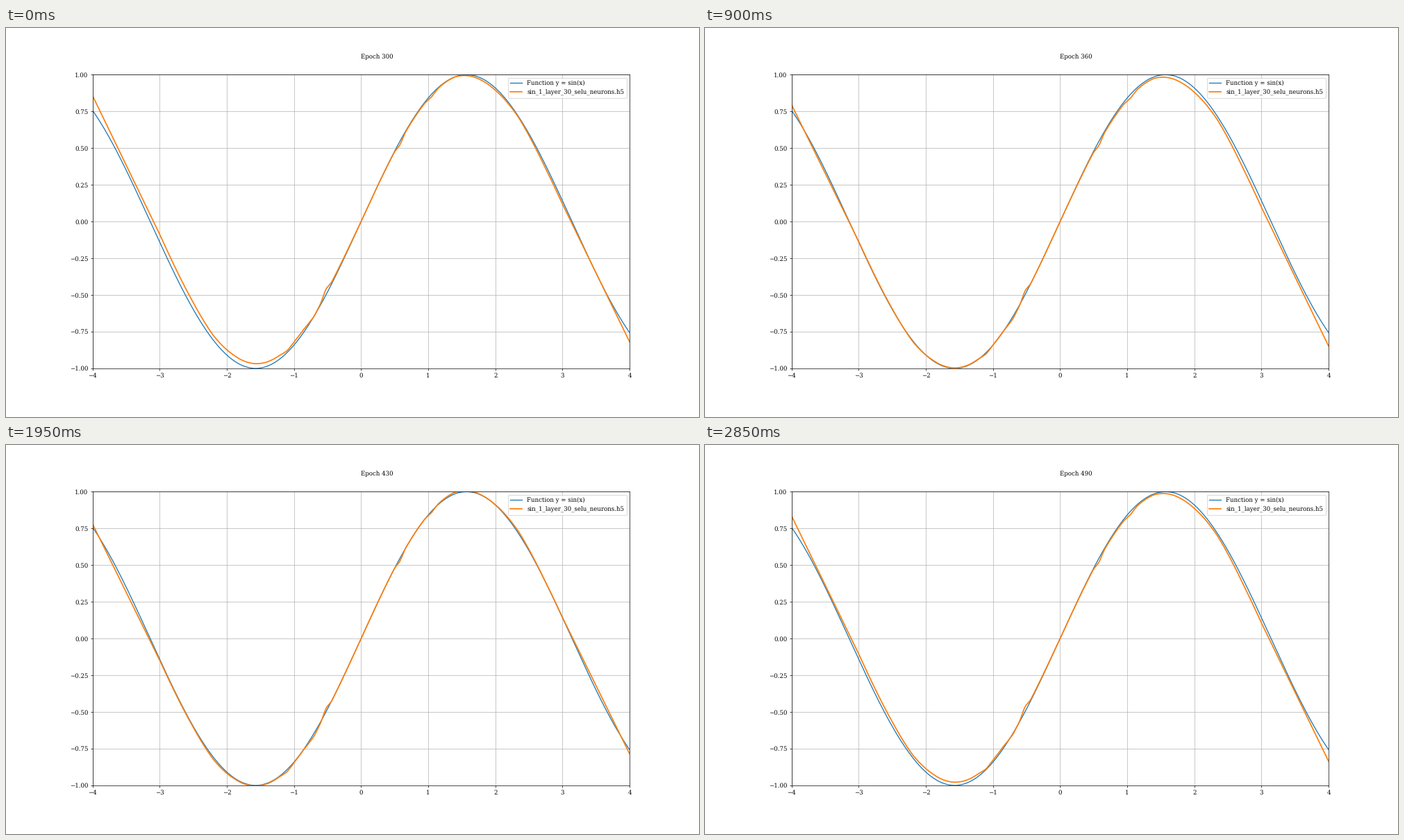
A matplotlib script that plays this animation: 998x561 px, repeating every 3000 ms.

```python
import numpy as np
import matplotlib.pyplot as plt
from matplotlib.animation import FuncAnimation

plt.rcParams["font.family"] = "DejaVu Serif"
plt.rcParams["font.size"] = 10
plt.rcParams["text.hinting"] = "none"

FRAMES = 20
INTERVAL = 150
FIRST_EPOCH, EPOCH_STEP = 300, 10

# Drift of the fit on either side of zero: epoch, left, right
DRIFT = np.array([
    (300, .031, -.020), (320, -.012, 0), (360, .003, -.039),
    (400, .031, -.053), (430, -.004, .002), (450, .001, .040),
    (490, .021, -.031),
])

# Lasting kinks in the fit: centre, half width, height
KINKS = [
    (-2.2, .3, -.010), (-1.1, .12, -.012), (-.7, .15, -.018),
    (-.52, .08, .027), (.58, .08, -.022), (1.05, .1, -.012),
    (1.4, .4, .010), (2.35, .35, .012),
]

# Beyond this distance from zero the fit runs straight
EDGE, EDGE_SLOPE = 3, -0.93

# The legend gives way when the curve reaches its lower left corner
LEGEND_X, LEGEND_Y = 2.17, 0.855


def base(x):
    r = np.abs(x)
    straight = np.sin(EDGE) + EDGE_SLOPE * (r - EDGE)
    return np.sign(x) * np.where(r < EDGE, np.sin(r), straight)


def kinks(x):
    return sum(height * np.clip(1 - np.abs(x - centre) / width, 0, 1)
               for centre, width, height in KINKS)


def prediction(x, epoch):
    left, right = (np.interp(epoch, DRIFT[:, 0], DRIFT[:, i]) for i in (1, 2))
    r = np.abs(x)
    drift = np.where(x < 0, left * (r / 1.5) ** 0.8, right * r / 2.6)
    return base(x) + kinks(x) + drift


fig = plt.figure(figsize=(16, 8.994), dpi=62.375)
ax = fig.add_axes([0.1249, 0.125, 0.775, 0.755])
ax.set_xlim(-4, 4)
ax.set_ylim(-1, 1)
ax.grid(True)

x = np.linspace(-4, 4, 400)
ax.plot(x, np.sin(x), color="tab:blue", lw=1.5, label="Function y = sin(x)")
fit, = ax.plot(x, np.sin(x), color="tab:orange", lw=2,
               label="sin_1_layer_30_selu_neurons.h5")
legend = ax.legend(loc="upper right")
title = fig.text(0.5125, 0.921, "")


def update(frame):
    epoch = FIRST_EPOCH + EPOCH_STEP * frame
    y = prediction(x, epoch)
    fit.set_ydata(y)
    title.set_text(f"Epoch {epoch}")
    crowded = np.interp(LEGEND_X, x, y) > LEGEND_Y
    legend.set_loc("upper left" if crowded else "upper right")
    return fit, title, legend


anim = FuncAnimation(fig, update, frames=FRAMES, interval=INTERVAL,
                     repeat=True, repeat_delay=0)
plt.show()
```
